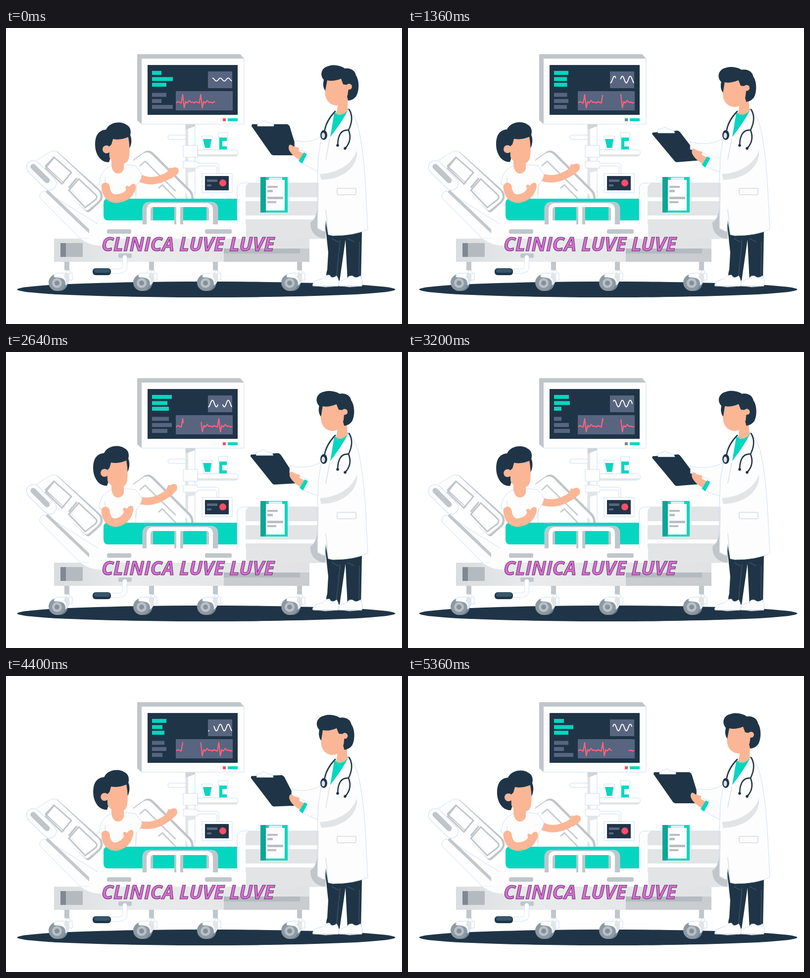
Write an HTML page that moves like this. It is 800 px wide and 600 px high and loops after 5440 ms.

```html
<!DOCTYPE html>
<html lang="es">
<head>
<meta charset="utf-8">
<style>
html, body { margin: 0; width: 100%; height: 100%; overflow: hidden; background: #fff; }
svg { display: block; width: 100vw; height: 100vh; }
.edge { fill: #fdfdfd; stroke: #bcd5f6; stroke-width: .8; }
.white { fill: #fdfdfd; }
.navy { fill: #1f3547; }
.teal { fill: #05d6c0; }
.skin { fill: #fbb696; }
.grey { fill: #c0c6ca; }
.pale { fill: #e2e4e6; }
.slate { fill: #586580; }
.line { fill: none; stroke-linecap: round; stroke-linejoin: round; }
.limb { stroke: #fbb696; }
.tube { stroke: #1f3547; stroke-width: 2.6; }
text { font: italic 700 39px "Open Sans", sans-serif; fill: #da6cd4; stroke: #54305a; stroke-width: 1; }
</style>
</head>
<body>
<svg viewBox="0 0 800 600" preserveAspectRatio="none">
  <defs>
    <linearGradient id="baseTone"><stop stop-color="#dadddf"/><stop offset=".3" stop-color="#e9ebec"/><stop offset="1" stop-color="#e0e2e4"/></linearGradient>
    <g id="caster">
      <path class="grey" d="M7-42H23V-20H7Z"/><path class="white" d="M7-42H13V-25H23V-18H7Z"/>
      <circle r="17" cx="3" fill="#76848f"/><circle r="17" cx="-2" fill="#8d99a2"/>
      <circle r="10" cx="-2" cy="1" fill="#b9c0c6"/><circle r="5" cx="-2" cy="1" fill="#84919b"/>
      <path class="edge" d="M-8-11V-14Q-7-19-1-19H17V-24H24V-19H29V-5H23Q20 3 15 6Q17-9 2-10Z"/>
      <path class="pale" d="M14-19H23V-5L16 4Q18-6 12-11Z"/>
    </g>
  </defs>

  <ellipse class="navy" cx="404.5" cy="530" rx="382" ry="16"/>

  <!-- monitor and stand -->
  <g>
    <path class="edge" d="M363 195H382V348H363Z"/>
    <path class="pale" d="M363 195H368V346H363Z"/><path fill="#cfd3d6" d="M363 195H382V199L363 206Z"/>
    <rect class="edge" x="327" y="217" width="37" height="9" rx="4"/>
    <path class="edge" d="M387 247H464Q470 248 469 254Q469 260 462 260H387Z"/>
    <path class="pale" d="M387 256H468Q466 260 461 260H387Z"/>
    <path class="edge" d="M358 238H387V262H358ZM358 270H387V274H424Q430 274 430 281V296H426V282Q426 280 422 280H387V284H358Z"/>
    <path class="pale" d="M363 262H368V270H363ZM363 284H382V290L363 294Z"/>
    <path class="edge" d="M395 219H417L413 246H400Z"/><path class="teal" d="M398 225H415L412 243H402Z"/>
    <path class="edge" d="M429 212H448V221H447V247H431V221H429Z"/><path class="teal" d="M431 222H446V246H431Z"/><path class="white" d="M437 229H447V240H437Z"/>
    <path class="edge" d="M396 295H457V334H396Z"/><path class="navy" d="M402 300H450V329H402Z"/>
    <path class="slate" d="M406 307H427V312H406ZM406 317H415V321H406Z"/><circle cx="438" cy="314" r="7" fill="#fb4d67"/>
    <path class="grey" d="M265 53H473L481 62V195H274L265 187Z"/><path class="white" d="M274 62H481V195H274Z"/>
    <path fill="none" stroke="#c5d9f3" stroke-width=".8" d="M481 62V195H274"/>
    <path class="navy" d="M286 75H468V176H286Z"/>
    <path class="slate" d="M408 88H457V122H408ZM343 128H458V167H343Z"/>
    <path class="teal" d="M448 183H468V189H448Z"/><rect id="lamp" x="438" y="183" width="6" height="6"/>
    <g id="bars"></g>
    <path id="pulse" class="line" stroke="#fff" stroke-width="1.9"/>
    <path id="heart" class="line" style="stroke-linecap:butt" stroke="#fb657c" stroke-width="2.2" pathLength="1" stroke-dasharray=".68 .32"/>
  </g>

  <!-- raised headrest and far rail -->
  <path class="line" stroke="#bfc5c9" stroke-width="8" d="M261 269L282 254Q289 250 296 257L370 331Q375 337 375 345"/>
  <path class="line" stroke="#fdfdfd" stroke-width="7" d="M259 272L278 258Q286 253 293 260L366 333Q371 338 371 346"/>
  <path class="line" stroke="#c8cdd0" stroke-width="3" d="M271 279L281 270L342 330M309 324L316 318L342 345"/>
  <path class="edge" d="M68 344Q67 334 78 330L196 404V427H150Z"/>
  <path class="line" stroke="#c3c8cc" stroke-width="6" d="M84 332L170 414"/>
  <path class="line" stroke="#bfc5c9" stroke-width="11" d="M102 256L188 334Q193 344 184 352L166 368L75 281L95 259Q99 255 104 259M142 299L121 325"/>
  <path class="line" stroke="#fdfdfd" stroke-width="11" d="M99 255L183 334Q189 342 180 350L163 364L70 280L91 258Q96 253 100 257M139 298L118 323"/>
  <path fill="none" stroke="#c0c6ca" stroke-width="3" d="M97 262L132 293L113 316L80 284ZM147 306L182 339Q185 343 181 348L160 364L127 329Z"/>
  <path fill="none" stroke="#bcd5f6" stroke-width=".8" d="M62 268L84 254Q95 245 105 252L188 326"/>
  <path class="line" stroke="#bcd5f6" stroke-width="28" d="M55 282L88 315"/><path class="line" stroke="#fdfdfd" stroke-width="26.5" d="M55 282L88 315"/>
  <path class="line" stroke="#bfc5c9" stroke-width="11" d="M55 281L83 309"/>

  <!-- patient -->
  <path id="farArm" class="line limb" stroke-width="15"/>
  <path id="farHand" class="skin" d="M324 294L330 285Q331 281 335 284Q343 280 348 285Q351 293 344 298L332 306Z"/>
  <path class="edge" d="M213 279Q237 275 262 279L275 297Q272 311 264 318L262 347H202L197 320L188 317Q189 289 213 279Z"/>
  <path class="line" stroke="#e0e3e5" stroke-width="1.5" d="M200 303L201 320M264 318L261 336"/>
  <path class="skin" d="M213 266H238V286Q235 295 225 295Q216 294 213 279Z"/>
  <g id="patientHead">
    <path class="navy" d="M208 272C190 273 180 254 180 237C180 215 189 207 202 206C209 190 233 188 243 196C252 200 253 210 251 217C255 226 253 238 250 243L240 260H212Z"/>
    <path class="skin" d="M208 238L213 224Q228 229 247 221Q251 244 249 258Q248 275 233 276Q215 275 209 262Z"/>
    <path class="navy" d="M200 223L217 222L213 236L208 241L202 238Z"/>
    <circle class="skin" cx="203" cy="246" r="8"/>
  </g>
  <path class="teal" d="M204 346H467V390H204Q197 388 197 380V354Q198 347 204 346Z"/>
  <path id="nearArm" class="line limb" stroke-width="17"/>
  <path id="nearHand" class="skin" d="M244 332L241 322Q244 317 249 322Q255 313 261 317Q264 323 260 332L252 342L240 339Z"/>

  <!-- footboard -->
  <path class="edge" d="M467 326Q467 314 480 314H630V427H467Z"/>
  <path class="pale" d="M484 325Q485 314 496 314H646V427H490Q484 425 484 418Z"/>
  <path class="white" d="M484 343H629V351H484ZM484 380H629V388H484Z"/>
  <path class="grey" d="M629 314H646V427H640Q614 420 615 394Q628 386 629 360Z"/>
  <path class="teal" d="M514 302H569V374H514Z"/><path fill="#08a798" d="M514 302H525V374H514Z"/><path class="white" d="M525 308H563V370H525Z"/>
  <path fill="#d5f3ef" d="M531 303H558V308H531Z"/>
  <path fill="#b8bec3" d="M528 320H549V324H528ZM528 328H539V333H528ZM528 342H560V347H528ZM528 351H546V355H528Z"/>

  <!-- near rail -->
  <path class="grey" fill-rule="evenodd" d="M276 398V366Q277 353 290 353H416Q428 354 428 367V398ZM297 398V363H340V398ZM358 398V363H405V398Z"/>
  <path class="line" stroke="#fdfdfd" stroke-width="8" style="stroke-linecap:butt" d="M288 398V368Q289 359 297 359H406Q414 360 414 368V398M348 359V398"/>
  <path class="line" stroke="#bcd5f6" stroke-width=".8" d="M276 398V366Q277 353 290 353H416Q428 354 428 367V398"/>
  <path class="white" d="M168 398H485V427H168ZM292 390H340V398H292ZM358 390H410V398H358Z"/>
  <rect class="grey" x="204" y="408" width="49" height="9" rx="3"/><rect class="grey" x="402" y="408" width="54" height="9" rx="3"/>

  <!-- base -->
  <path fill="url(#baseTone)" d="M97 427H613V474H97Z"/>
  <path class="white" d="M150 427H196V441Q172 443 150 427Z"/>
  <path fill="#c9cdd0" d="M440 447H613V474H440Z"/><path fill="#b4bbc0" d="M440 447H594V457H440Z"/>
  <path fill="#b3bac0" d="M110 436H155V464H110Z"/><path fill="#7e8993" d="M110 436H121V464H110Z"/>
  <rect class="grey" x="227" y="457" width="27" height="9" rx="3"/>
  <path class="line" stroke="#c8dcf6" stroke-width="10" d="M240 465V483Q240 492 228 493H211"/><path class="line" stroke="#fdfdfd" stroke-width="8.5" d="M240 465V483Q240 492 228 493H211"/>
  <rect class="navy" x="175" y="487" width="37" height="14" rx="6"/><rect fill="#36576b" x="178" y="488" width="32" height="8" rx="4"/>
  <use href="#caster" x="105" y="516"/><use href="#caster" x="276" y="516"/><use href="#caster" x="405" y="516"/><use href="#caster" x="575" y="516"/>
  <text x="193" y="452">CLINICA LUVE LUVE</text>

  <!-- doctor -->
  <path class="navy" d="M644 390L688 414L674 512L652 514Q644 505 649 490L651 455ZM685 412H719L717 514H690Z"/>
  <path class="line" stroke="#3b5263" stroke-width="1.5" d="M675 430L668 500M714 434L713 500M659 427L672 434M690 427L703 433"/>
  <path class="edge" d="M619 522Q620 512 640 508Q647 499 654 501Q658 510 668 502Q674 511 672 523L645 525Z"/>
  <path class="edge" d="M671 522Q672 512 689 508Q693 500 701 503Q707 509 716 502Q722 513 719 523L694 525Z"/>
  <path class="line" stroke="#d5d9db" stroke-width="1.5" d="M621 523H670M673 523H718"/>
  <path id="board" class="navy"/><path id="boardClip" class="edge"/>
  <path id="sleeve" class="edge"/>
  <path class="edge" d="M664 169L694 164Q709 184 714 211Q724 260 728 350L731 408Q704 421 660 421L651 419L646 390L644 413Q634 411 629 404V314L631 260L640 205Q650 181 664 169Z"/>
  <path class="pale" d="M629 314H632L630 405L643 412L629 407ZM634 296C672 294 700 275 709 248C712 274 690 306 637 308Z"/>
  <path class="line" stroke="#d9dde0" stroke-width="1.5" d="M654 225L646 266M646 368L651 417"/>
  <rect x="669" y="325" width="38" height="13" rx="2" fill="none" stroke="#e0e2e4" stroke-width="2"/>
  <path class="teal" d="M655 221L663 173L692 163Q684 183 655 221Z"/>
  <path id="neck" class="skin"/>
  <g id="doctorHead">
    <path class="skin" d="M646 104H692V140Q683 157 666 157Q649 154 645 137Q643 118 646 104Z"/>
    <path class="navy" d="M645 127C639 119 641 110 642 105C633 95 637 80 652 77C662 73 678 77 684 82C698 80 706 88 707 96C715 108 713 130 707 139Q700 147 691 147L688 133L690 116L681 114L677 103Q660 109 649 106Z"/>
    <circle class="skin" cx="693" cy="119" r="6"/><path class="skin" d="M684 115H693L690 137L682 140Z"/>
  </g>
  <path class="line tube" d="M665 169Q645 190 643 213M693 165Q704 182 692 207Q671 205 670 237M692 207Q700 227 686 243"/>
  <ellipse class="navy" cx="642" cy="217" rx="7" ry="10"/><ellipse fill="#dce0e3" cx="641" cy="218" rx="3.5" ry="6"/>
  <circle class="navy" cx="670" cy="238" r="2.8"/><circle class="navy" cx="685" cy="244" r="2.8"/>
  <g id="doctorHand">
    <path class="skin" d="M572 238Q574 234 581 240L592 243L591 249L601 254L592 267Q579 259 574 251Q569 244 572 238Z"/>
    <path class="teal" d="M591 269L602 252L608 256L598 275Z"/>
  </g>
</svg>
<script>
const LOOP = 5440, STEP = 80;
const $ = id => document.getElementById(id);
const set = (id, attrs) => { for (const k in attrs) $(id).setAttribute(k, attrs[k]); };
const frac = x => x - Math.floor(x);
const mix = (a, b, k) => a + (b - a) * k;
const smooth = (a, b, x) => {
  const k = Math.min(1, Math.max(0, (x - a) / (b - a)));
  return k * k * (3 - 2 * k);
};
const move = (id, x, y) => set(id, { transform: `translate(${x} ${y})` });

// Blends every number of path a with the one at the same position in path b.
function morph(a, b, k) {
  const goal = b.match(/-?[\d.]+/g);
  let i = 0;
  return a.replace(/-?[\d.]+/g, n => mix(+n, +goal[i++], k).toFixed(2));
}

const keyTimes = [0, 880, 1840, 2640, 3200, 4400, 5360];
function keyed(values, t) {
  let i = keyTimes.length - 2;
  while (i > 0 && t < keyTimes[i]) i--;
  return mix(values[i], values[i + 1], smooth(keyTimes[i], keyTimes[i + 1], t));
}

const barWidths = [
  [19, 30, 28, 40, 30, 29, 20],
  [42, 31, 21, 31, 32, 21, 39],
  [29, 15, 38, 34, 15, 25, 29]
];
const barRows = [[87, 0], [99.5, 1], [111, 2], [131.5, 2], [144, 0], [156, 1]];
const bars = barRows.map(([y], i) => {
  const bar = document.createElementNS("http://www.w3.org/2000/svg", "rect");
  bar.setAttribute("class", i < 3 ? "teal" : "slate");
  for (const [k, v] of [["x", 295], ["y", y], ["height", 8]]) bar.setAttribute(k, v);
  return $("bars").appendChild(bar);
});

const beat = "l3-3l4 2l3 1l3-17l3 27l3-13l3 3l4-5l4 4l3-1l3.5 2";
set("heart", { d: "M344 152" + beat.repeat(3) + "l4-1" });

function pulsePath(t) {
  const gap = 48 * frac(5 * t / LOOP), height = t < LOOP / 5 ? 3 : 6.8;
  let d = "", drawing = false;
  for (let x = 1; x <= 48; x += .5) {
    const hidden = (x - gap + 48) % 48 < 9.5;
    if (!hidden) {
      const y = 104.5 - height * Math.cos((x - 9) * 2 * Math.PI / 16);
      d += `${drawing ? "L" : "M"}${408 + x} ${y.toFixed(2)}`;
    }
    drawing = !hidden;
  }
  return d;
}

function draw(t) {
  const phase = frac(3 * t / LOOP);
  const sway = (1 - Math.cos(2 * Math.PI * phase)) / 2;
  const nod = smooth(0, .5, phase) * (1 - smooth(.73, .95, phase));
  const tilt = smooth(.36, .5, phase) * (1 - smooth(.74, .95, phase));

  bars.forEach((bar, i) => bar.setAttribute("width", keyed(barWidths[barRows[i][1]], t)));
  set("pulse", { d: pulsePath(t) });
  set("heart", { "stroke-dashoffset": -frac(phase) });
  const glow = keyed([0, .3, .85, 0, .5, 0, 0], t);
  const lamp = [251, 77, 103].map((c, i) => Math.round(mix(c, [5, 185, 165][i], glow)));
  set("lamp", { fill: `rgb(${lamp})` });

  move("patientHead", -4 * sway, -sway);
  set("farArm", { d: morph("M269 303Q296 319 333 296", "M269 301Q302 308 331 283", sway) });
  set("farHand", { transform: `translate(${-2 * sway} ${-14 * sway}) rotate(${-10 * sway} 335 294)` });
  set("nearArm", { d: morph("M201 322Q204 346 223 346Q243 344 250 332", "M201 322Q203 346 222 346Q239 343 246 328", sway) });
  move("nearHand", -5 * sway, -4 * sway);

  set("doctorHead", { transform: `translate(${-8 * nod} ${3 * nod}) rotate(${-2 * nod} 678 150)` });
  set("neck", { d: morph("M672 149L691 140L690 167Q679 180 667 174Z", "M670 152L688 143L690 167Q679 180 667 174Z", nod) });
  set("board", { d: morph("M497 195L568 195Q571 196 573 199L591 258L540 258Q537 258 535 255L496 199Z",
    "M494 212L545 208Q548 209 551 213L593 268L543 272Q540 272 538 269L493 215Z", tilt) });
  set("boardClip", { d: morph("M508 193L518 191Q523 185 527 191L541 194L541 199L508 199Z",
    "M504 206L514 204Q519 199 524 204L537 208L539 213L505 213Z", tilt) });
  set("sleeve", { d: morph("M583 228Q613 236 638 219L650 296L632 292Q612 282 598 274L608 252Q596 247 583 246Z",
    "M570 231Q606 241 638 224L650 296L632 292Q614 288 600 281L610 260Q594 250 570 246Z", tilt) });
  move("doctorHand", 2.5 * tilt, 8 * tilt);
}

const start = performance.now();
function tick() {
  const t = (performance.now() - start) % LOOP;
  draw(Math.floor(t / STEP) * STEP);
  requestAnimationFrame(tick);
}
draw(0);
requestAnimationFrame(tick);
</script>
</body>
</html>
```
